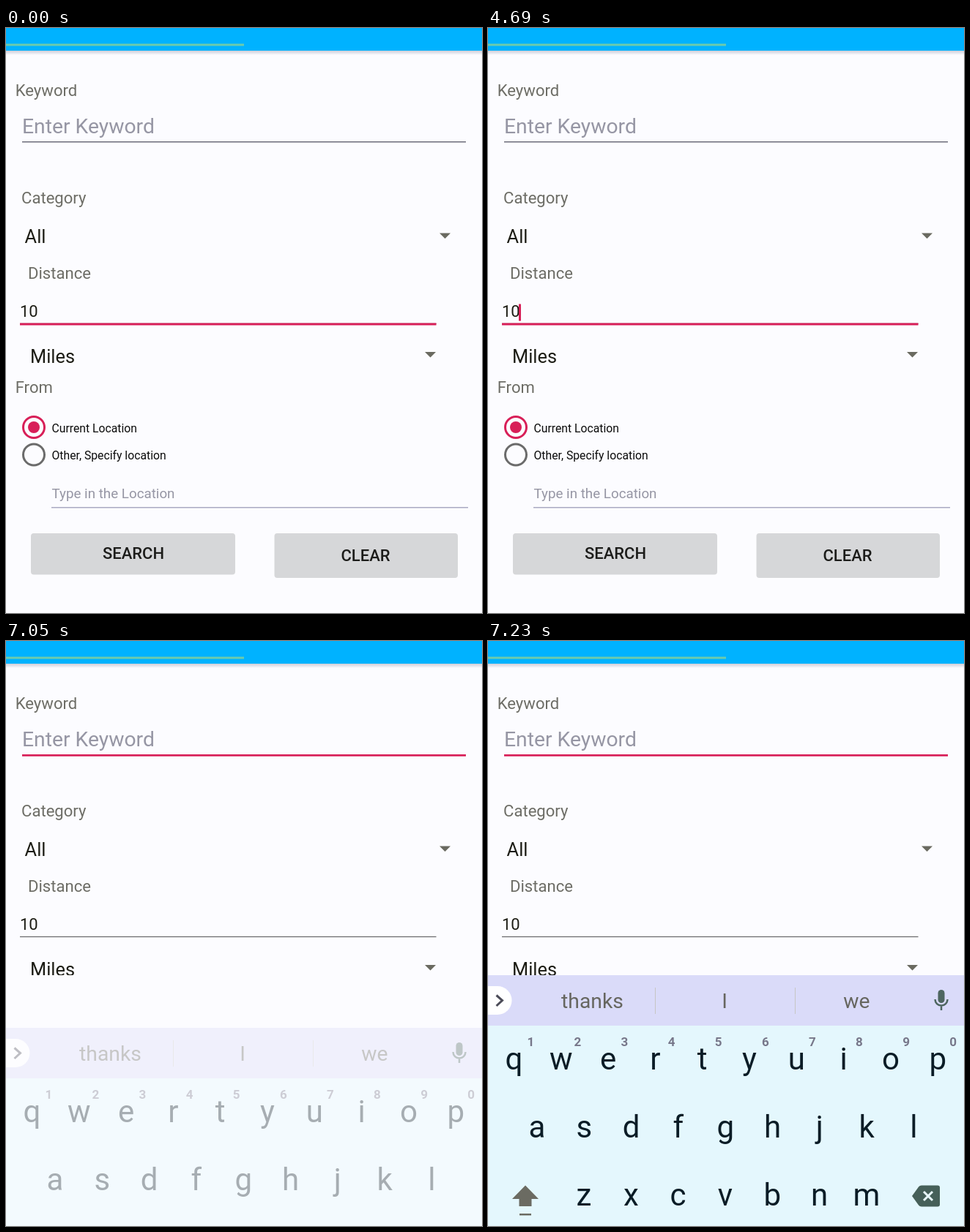
Write an HTML page that moves like this. It is 650 by 800 pixels and loops after 8 s.

```html
<!DOCTYPE html>
<html lang="en">
<head>
<meta charset="utf-8">
<style>
html, body { margin: 0; width: 100%; height: 100%; overflow: hidden; background: #fcfcff; }
svg { display: block; font-family: Roboto, sans-serif; }
.label { font-size: 22.1px; fill: #6d6d66; }
.value { font-size: 25.4px; fill: #1c1c14; }
.small { font-size: 15.75px; fill: #0c0c0c; }
.hint { fill: #9696a4; }
.button { font-size: 22px; font-weight: 500; fill: #1c1c1a; text-anchor: middle; }
.accent { fill: #d81f58; }
.word { font-size: 28.3px; fill: #66665f; text-anchor: middle; }
.key { font-size: 42px; fill: #0a1c26; text-anchor: middle; }
.digit { font-size: 17px; font-weight: 700; fill: #77778a; text-anchor: middle; }
</style>
</head>
<body>
<svg width="650" height="800" viewBox="0 0 650 800">
  <defs>
    <linearGradient id="shade" x2="0" y2="1">
      <stop stop-color="#ceced9"/><stop offset="1" stop-color="#fcfcff"/>
    </linearGradient>
    <clipPath id="visible"><rect id="pageClip" width="650" height="800"/></clipPath>
  </defs>
  <rect width="650" height="800" fill="#fcfcff"/>
  <g clip-path="url(#visible)">
    <rect y="31" width="650" height="6" fill="url(#shade)"/>
    <rect width="650" height="31" fill="#00b2ff"/>
    <rect y="21.5" width="325" height="3" fill="#6ccbac"/>

    <g class="label">
      <text x="12.7" y="93">Keyword</text>
      <text x="21" y="240">Category</text>
      <text x="30" y="343">Distance</text>
      <text x="12.7" y="498.5">From</text>
    </g>
    <text class="hint" x="22" y="144" font-size="28.3">Enter Keyword</text>
    <rect x="22" y="155" width="606" height="1.5" fill="#6d6d7a"/>
    <rect id="keywordLine" class="accent" x="22" y="155" width="606" height="2.7"/>
    <rect id="keywordCaret" x="22" y="114" width="3" height="38" fill="#c9304f"/>

    <g class="value">
      <text x="25.6" y="294">All</text>
      <text x="33" y="458">Miles</text>
    </g>
    <text x="19" y="395" font-size="22" fill="#1c1c14">10</text>
    <path d="M592 280.5h15l-7.5 7.5zM572 443h15l-7.5 7.5z" fill="#6a6a60"/>
    <rect x="19" y="403.8" width="568.5" height="1.3" fill="#6d6d70"/>
    <rect id="distanceLine" class="accent" x="19" y="403.5" width="568.5" height="3"/>
    <rect id="distanceCaret" class="accent" x="42" y="377.5" width="3" height="23"/>

    <g fill="none" stroke-width="3">
      <circle cx="38" cy="546" r="14.5" stroke="#d81f58"/>
      <circle cx="38" cy="583.5" r="14.5" stroke="#6b6b6b"/>
    </g>
    <circle class="accent" cx="38" cy="546" r="8"/>
    <g class="small">
      <text x="62.5" y="552.5">Current Location</text>
      <text x="62.5" y="589.5">Other, Specify location</text>
    </g>
    <text class="hint" x="62.5" y="642.5" font-size="18.8">Type in the Location</text>
    <rect x="62" y="655" width="569" height="1.5" fill="#aaaac2"/>

    <g fill="#d6d7d9">
      <rect x="34" y="691" width="279" height="56.5" rx="4"/>
      <rect x="366.5" y="691" width="250.5" height="61" rx="4"/>
    </g>
    <g class="button">
      <text x="174" y="726">SEARCH</text>
      <text x="491" y="728.5">CLEAR</text>
    </g>
  </g>

  <g id="keyboard">
    <rect y="457" width="650" height="69" fill="#dadbf9"/>
    <rect y="526" width="650" height="274" fill="#e4f7fd"/>
    <rect x="-30" y="472" width="62.5" height="39" rx="19.5" fill="#fff"/>
    <path d="M11.5 484.5l8 7-8 7.5" fill="none" stroke="#4c4c58" stroke-width="3"/>
    <path d="M228.5 474v36M419.5 474v36" stroke="#c6c6c4"/>
    <g class="word">
      <text x="142.5" y="502">thanks</text>
      <text x="323" y="502">I</text>
      <text x="503.5" y="502">we</text>
    </g>
    <rect x="614.5" y="477" width="9" height="18" rx="4.5" fill="#4e6660"/>
    <path d="M610.5 490a8.5 8.5 0 0 0 17 0M619 499v6" fill="none" stroke="#4e6660" stroke-width="2.5"/>
    <g id="keys"></g>
    <path d="M33 763l18-18.5 18 18.5h-9.5v10h-17v-10zM43 783h16v2.5h-16z" fill="#6b6b62"/>
    <path d="M579 759l9-12.5q1.5-2 4-2h22q3 0 3 3v23q0 3-3 3h-22q-2.5 0-4-2z" fill="#466059"/>
    <path d="M595 753l12 12m0-12l-12 12" stroke="#e8f8fc" stroke-width="3"/>
  </g>
</svg>
<script>
const $ = id => document.getElementById(id);
const LOOP = 8000, PITCH = 64.3;
const FOCUS = 6530, OPEN = 7050;

function addText(cls, x, y, text) {
  const el = document.createElementNS("http://www.w3.org/2000/svg", "text");
  el.setAttribute("class", cls);
  el.setAttribute("x", x);
  el.setAttribute("y", y);
  el.textContent = text;
  $("keys").append(el);
}

[["qwertyuiop", 35.5, 586], ["asdfghjkl", 67, 679], ["zxcvbnm", 131, 772]].forEach(([row, x, y]) =>
  [...row].forEach((c, i) => addText("key", x + i * PITCH, y, c)));
[..."1234567890"].forEach((c, i) => addText("digit", 58.3 + i * 64.1, 554, c));

// Distance caret toggles on, off, on, ...
const blinks = [690, 1180, 1690, 2160, 2680, 3150, 3690, 4170, 4690, 5180, 5710, 6220];
// Keyboard entrance: time, offset, opacity
const slide = [[0, 0, 0], [OPEN, 72, .35], [7090, 42, .7], [7150, 15, .9], [7190, 4, .97], [7230, 0, 1]];

const show = (id, opacity) => $(id).setAttribute("opacity", +opacity);

function draw(t) {
  const focus = Math.min(1, Math.max(0, (t - FOCUS + 40) / 170));
  show("keywordLine", focus);
  show("distanceLine", 1 - focus);
  show("keywordCaret", t >= FOCUS && t < OPEN);
  show("distanceCaret", blinks.filter(b => b <= t).length % 2);

  const [, dy, opacity] = slide.findLast(s => s[0] <= t);
  show("keyboard", opacity);
  $("keyboard").setAttribute("transform", `translate(0 ${dy})`);
  $("pageClip").setAttribute("height", t < OPEN ? 800 : 457);
}

const start = performance.now();
function tick() {
  draw((performance.now() - start) % LOOP);
  requestAnimationFrame(tick);
}
tick();
</script>
</body>
</html>
```
